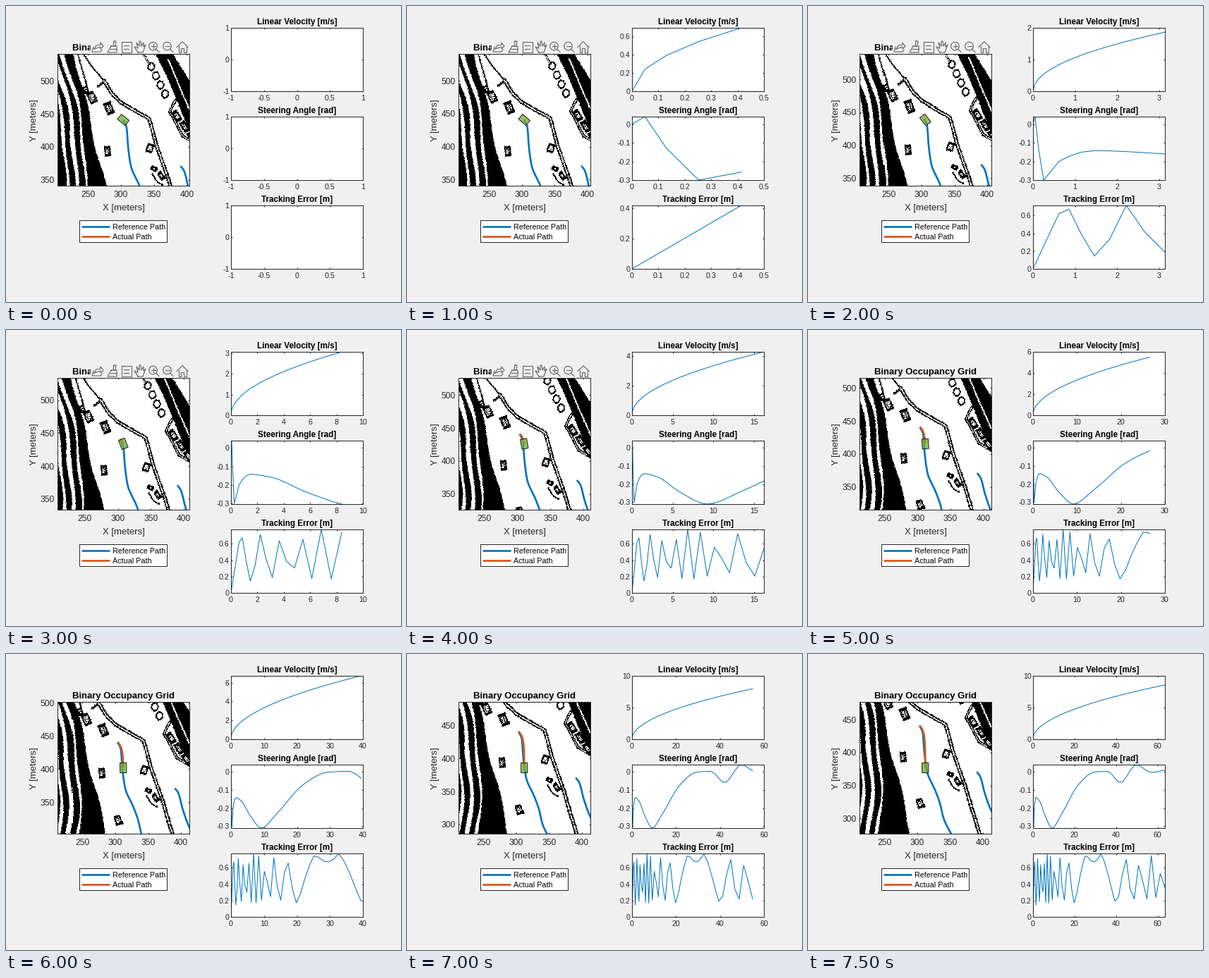
Animation of 560 by 420 pixels, one loop 8000 ms. Source, as a matplotlib script:

```python
import numpy as np
import matplotlib.pyplot as plt
from matplotlib.animation import FuncAnimation
from matplotlib.colors import to_rgba
from matplotlib.patches import Circle, Polygon, Rectangle
from matplotlib.path import Path

W, H = 560, 420
PT = 0.72                      # points per pixel at 100 dpi
INK, GREY, PANEL = "#262626", "#6A6A6A", "#F0F0F0"
BLUE, ORANGE, GREEN = "#0072BD", "#D95319", "#77AC30"
plt.rcParams.update({"font.family": "Liberation Sans", "axes.unicode_minus": False,
                     "axes.linewidth": PT, "axes.edgecolor": INK})


def smooth(points, at):
    """Monotone cubic curve through a few (x, y) points."""
    x, y = np.array(points, float).T
    h, d = np.diff(x), np.diff(y) / np.diff(x)
    m = np.r_[d[0], np.zeros(len(x) - 2), d[-1]]
    same = d[:-1] * d[1:] > 0
    m[1:-1][same] = 2 * d[:-1][same] * d[1:][same] / (d[:-1] + d[1:])[same]
    i = np.clip(np.searchsorted(x, at, side="right") - 1, 0, len(h) - 1)
    t = (at - x[i]) / h[i]
    return (y[i] + t * t * (3 - 2 * t) * (y[i + 1] - y[i])
            + h[i] * t * (1 - t) * ((1 - t) * m[i] - t * m[i + 1]))


# ---- run data: constant acceleration, four samples per step ----
SAMPLE = np.arange(57)
DIST = (.08 + .1409 * SAMPLE) ** 2
DIST[0] = 0
SPEED = 1.09 * np.sqrt(DIST) - .12 * (1 - np.exp(-DIST / 4))
STEER = smooth([(0, 0), (1, .04), (3, -.3), (5, -.2), (8, -.142), (12, -.16), (17, -.25),
                (21, -.31), (26, -.228), (33, -.064), (38, -.001), (42, .003),
                (45.5, -.06), (49.5, .04), (53, -.003), (56, .01)], SAMPLE)
# error is the distance to the nearest waypoint plus a small side offset
GAP = 1.52
ALONG = np.abs((DIST + GAP / 2) % GAP - GAP / 2)
ERROR = np.hypot(ALONG, .17 * (1 - np.exp(-DIST)))

# ---- vehicle track: heading settles from 39 degrees below x to straight down ----
ODO = np.linspace(0, 64, 641)
HEADING = np.radians(-90 + 51 * np.exp(-ODO / 10))
STEP = 1.04 * ODO[1]
TRACK_X = 303.4 + STEP * (np.cumsum(np.cos(HEADING)) - np.cos(HEADING[0]))
TRACK_Y = 441 + STEP * (np.cumsum(np.sin(HEADING)) - np.sin(HEADING[0]))


def pose(s):
    return [np.interp(s, ODO, k) for k in (TRACK_X, TRACK_Y, HEADING)]


# ---- occupancy map, on a pixel grid of the first view ----
SCALE = 0.9325
U0, U1, V0, V1 = 68, 276, 58, 324
rng = np.random.default_rng(4)
U, V = np.meshgrid(np.arange(U0, U1) + .5, np.arange(V0, V1) + .5)
U = U + rng.normal(0, .35, U.shape)
V = V + rng.normal(0, .35, V.shape)
grid = np.zeros(U.shape, bool)


def fill(points):
    inside = Path(points).contains_points(np.c_[U.ravel(), V.ravel()])
    grid[inside.reshape(U.shape)] = True


def stroke(points, width, gap=0):
    best = np.full(U.shape, 1e9)
    for (ax, ay), (bx, by) in zip(points, points[1:]):
        dx, dy = bx - ax, by - ay
        t = np.clip(((U - ax) * dx + (V - ay) * dy) / (dx * dx + dy * dy), 0, 1)
        best = np.minimum(best, np.hypot(U - ax - t * dx, V - ay - t * dy))
    grid[best < width / 2] = True
    grid[best < gap / 2] = False


def house(cx, cy, w, h, deg, density=.4):
    c, s = np.cos(np.radians(deg)), np.sin(np.radians(deg))
    a = np.abs((U - cx) * c + (V - cy) * s) / (w / 2)
    b = np.abs((V - cy) * c - (U - cx) * s) / (h / 2)
    r = np.maximum(a, b)
    grid[(r < 1) & ((r > 1 - 4.5 / min(w, h)) | (rng.random(U.shape) < density))] = True


def ring(cx, cy, rx, ry):
    r = np.hypot((U - cx) / rx, (V - cy) / ry)
    grid[(r < 1) & (r > 1 - 2 / rx)] = True


def build_map():
    # rail yard on the left: one dark bank cut by winding white channels
    bank = 95 + .235 * (V - 60) + 2 * np.sin(V / 18)
    grid[U < bank] = True
    for k, width in enumerate((3.5, 6, 4.5)):
        middle = bank - 13 - .001 * (V - 130) ** 2 - 13 * k
        taper = .05 * np.maximum(150 - V, 0) + np.sin(V / 15 + k)
        grid[np.abs(U - middle) < (width + taper) / 2] = False
    stroke([(101, 66), (108, 90), (117, 122)], 2)

    house(122, 130, 11, 17, -25)
    house(113, 119, 8, 11, -25)
    house(146, 145, 11, 18, -22)
    house(144, 206, 9, 15, -5)
    house(167, 272, 10, 14, -20)

    stroke([(104, 60), (124, 89), (139, 106), (150, 123)], 2)
    stroke([(130, 114), (141, 107)], 3)
    stroke([(139, 106), (150, 124), (163, 137), (180, 147), (203, 160), (214, 200),
            (230, 245), (254, 324)], 5.5, 1.5)

    stroke([(190, 60), (203, 82)], 3, 1)
    for k in range(4):
        ring(206 + 6.5 * k, 86 + 13 * k, 5.5, 6.5)
    fill([(208, 60), (232, 60), (260, 106), (276, 130), (276, 196), (260, 178),
          (244, 138), (227, 98)])
    stroke([(230, 76), (250, 124), (268, 164)], 0, 2)
    stroke([(240, 134), (232, 150), (240, 164), (250, 184), (276, 200)], 4, 1)
    for k in range(3):
        house(242 + 11 * k, 156 + 15 * k, 9, 17, -32)

    house(204, 202, 10, 13, 20, .25)
    house(210, 231, 10, 7, 30, .3)
    house(220, 241, 7, 13, -35, .2)
    stroke([(207, 238), (214, 249), (222, 254)], 2)


build_map()

# ---- layout ----
fig = plt.figure(figsize=(W / 100, H / 100), dpi=100, facecolor=PANEL)


def axes(x0, y0, x1, y1, size, xpad, ypad):
    ax = fig.add_axes([x0 / W, 1 - y1 / H, (x1 - x0) / W, (y1 - y0) / H])
    ax.tick_params(direction="in", top=True, right=True, length=2 * PT, width=PT,
                   labelsize=size * PT, color=INK, labelcolor=INK)
    ax.tick_params(axis="x", pad=xpad * PT)
    ax.tick_params(axis="y", pad=ypad * PT)
    return ax


def label(x, y, text, size, color="black", ha="center", va="baseline", **kw):
    fig.text(x / W, 1 - y / H, text, size=size * PT, color=color, ha=ha, va=va, **kw)


def overlay(z):
    ax = fig.add_axes([0, 0, 1, 1], zorder=z)
    ax.set(xlim=(0, W), ylim=(H, 0))
    ax.axis("off")
    return ax


def ticks(axis, lo, hi, step):
    t = np.arange(np.ceil(lo / step - 1e-6), np.floor(hi / step + 1e-6) + 1) * step + 0.0
    axis.set_ticks(t, [f"{v:g}" for v in t])


def span(ax, x, y):
    ax.set(xlim=x[:2], ylim=y[:2])
    ticks(ax.xaxis, *x)
    ticks(ax.yaxis, *y)


plots = []
for row, name in enumerate(["Linear Velocity [m/s]", "Steering Angle [rad]",
                            "Tracking Error [m]"]):
    top = 31 + 126 * row
    ax = axes(319, top, 506, top + 90, 10.67, 5.5, 2.5)
    label(413, top - 4.6, name, 11.6, weight="bold")
    plots.append((ax, ax.plot([], [], color=BLUE, lw=PT)[0]))


def to_m(u, v):
    return (u - 166.75) / SCALE + 303.4, 441 - (v - 161.75) / SCALE


site = axes(73, 68, 259.5, 255, 12, 7.2, 4)
(left, top), (right, bottom) = to_m(U0, V0), to_m(U1, V1)
site.imshow(~grid, cmap="gray", vmin=0, vmax=1, interpolation="nearest", aspect="auto",
            extent=(left, right, bottom, top))
thick = dict(lw=2.67 * PT, solid_capstyle="butt")
# reference path pieces as (y, x) points
for piece in ([(260, 361), (276, 352), (300.5, 340), (323, 334.5), (341, 328), (371, 315),
               (400, 310.8), (430, 308.3), (441, 303.4)],
              [(302, 418), (314, 411.5), (339, 402.5), (363.5, 395.8), (371, 390.5)]):
    y = np.linspace(piece[0][0], piece[-1][0], 80)
    site.plot(smooth(piece, y), y, color=BLUE, **thick)
trail, = site.plot([], [], color=ORANGE, **thick)
car = site.add_patch(Polygon([(0, 0)] * 4, fc=to_rgba(GREEN, .75), ec="#1A1A1A",
                             lw=PT, zorder=4))
label(167, 63, "Binary Occupancy Grid", 13.1, weight="bold")
label(167, 290, "X [meters]", 13.1, INK)
label(39.5, 162, "Y [meters]", 13.1, INK, va="center", rotation=90)

key = overlay(2)
key.add_patch(Rectangle((104, 304), 124, 31, fc="white", ec=INK, lw=PT))
for y, color, text in [(313, BLUE, "Reference Path"), (327, ORANGE, "Actual Path")]:
    key.plot([107, 147], [y, y], color=color, **thick)
    label(151, y + 4.2, text, 10.8, ha="left", zorder=4)

# ---- hover toolbar, hides most of the map title ----
bar = overlay(6)
bar.add_patch(Rectangle((120, 48), 141, 19, fc=PANEL, ec="none"))


def pen(*points):
    bar.plot(*zip(*points), color=GREY, lw=1.2 * PT)


def lens(x):
    bar.add_patch(Circle((x, 57), 5.8, fc="none", ec=GREY, lw=1.2 * PT))
    pen((x + 4, 61), (x + 8.5, 65.5))
    pen((x - 3, 57), (x + 3, 57))


# export, brush, data tip, pan, zoom in, zoom out, home
pen((124, 58), (122, 65), (134, 65), (136, 62))
pen((125, 61), (128, 56), (134, 55), (134, 52), (138, 57), (134, 61), (134, 58), (125, 61))
pen((153, 50), (156, 50), (155, 57), (152, 57), (153, 50))
pen((149, 57), (157, 57), (157, 66), (144, 66), (149, 57))
pen((148, 61), (157, 61))
pen((163.5, 50.5), (177.5, 50.5), (177.5, 65.5), (163.5, 65.5), (163.5, 50.5))
for y in (55.5, 60.5):
    pen((167, y), (174, y))
pen((187, 66), (182, 58), (187, 60), (185, 52), (189, 57), (189, 50), (191, 50), (192, 57),
    (195, 52), (195, 58), (198, 55), (194, 66), (187, 66))
lens(208.5)
pen((208.5, 54), (208.5, 60))
lens(228.5)
pen((242, 58.5), (250, 50.5), (258, 58.5))
pen((244.5, 57), (244.5, 66), (248, 66), (248, 60), (252, 60), (252, 66), (255.5, 66),
    (255.5, 57))


def limits(value, cuts, snug):
    """Axis from 0 to a round top, or to the value when that leaves too much space."""
    unit = 10 ** np.floor(np.log10(value))
    step = (.5, 1, 2, 5)[np.searchsorted(cuts, value / unit)] * unit
    top = np.ceil(value / step) * step
    if value / top < snug:
        return 0, value, min(step, 2 * unit)
    return 0, top, step


def update(i):
    s = (.08 + .5636 * (i - 1)) ** 2 if i > 1 else .3 * i
    x, y, a = pose(s)
    site.set(xlim=(x - 100, x + 100), ylim=(y - 100, y + 100))
    ticks(site.xaxis, x - 100, x + 100, 50)
    ticks(site.yaxis, y - 100, y + 100, 50)
    trail.set_data(*pose(np.linspace(0, s, 60))[:2])
    along = 7.5 * np.array([np.cos(a), np.sin(a)])
    side = 4.9 * np.array([-np.sin(a), np.cos(a)])
    car.set_xy([(x, y) + p * along + q * side
                for p, q in [(1, 1), (1, -1), (-1, -1), (-1, 1)]])
    bar.set_visible(i < 9)

    n = 4 * (i - 1) + 1 if i > 1 else 0
    for (ax, line), data in zip(plots, (SPEED, STEER, ERROR)):
        seen = data[:n]
        line.set_data(DIST[:n], seen)
        if n == 0:
            span(ax, (-1, 1, .5), (-1, 1, 1))
            continue
        if data is SPEED:
            y_axis = limits(seen[-1], (1.5, 4, 6), .79)
        else:
            y_axis = seen.min(), seen.max(), .1 if data is STEER else .2
        span(ax, limits(s, (2.5, 5, 10), .815), y_axis)
    return []


anim = FuncAnimation(fig, update, frames=16, interval=500, repeat=True, repeat_delay=0)
plt.show()
```
